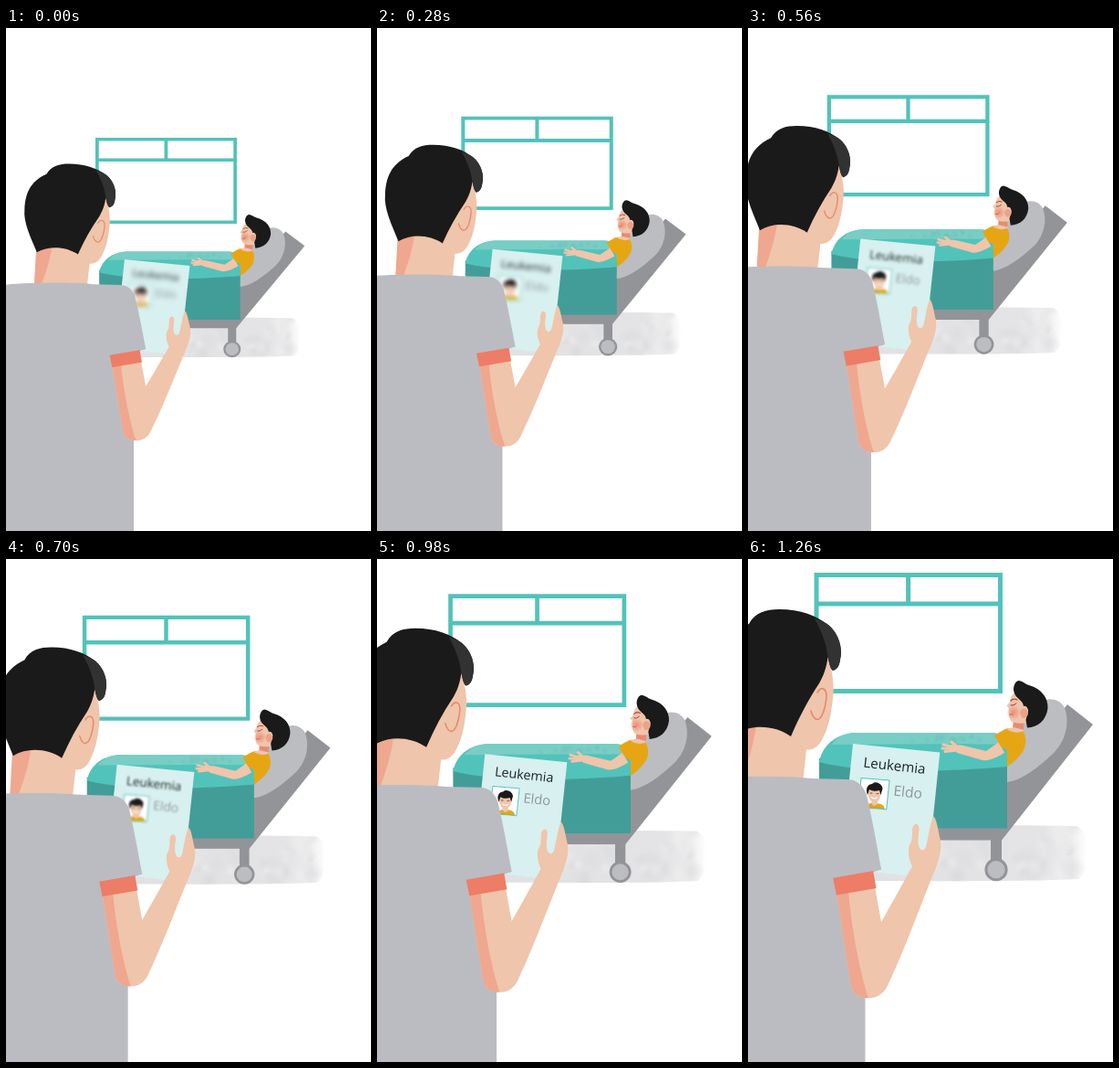
Recreate the animation shown at these times as an HTML page with a canvas. Size 400x550 px, loop 3.22 s.

```html
<!DOCTYPE html>
<html lang="en">
<head>
<meta charset="utf-8">
<title>Bedside</title>
<style>
html, body { margin: 0; height: 100%; overflow: hidden; background: #fff; }
canvas { display: block; width: 400px; height: 550px; }
</style>
</head>
<body>
<canvas id="stage" width="400" height="550"></canvas>
<script>
const ctx = document.getElementById('stage').getContext('2d');

const LOOP = 3220, STEP = 70, STEPS = 18;
const PIVOT = { x: 174.8, y: 379.5 };
const START = { x: 0.7506, y: 0.712 };
const FONT = '"Open Sans", "Noto Sans", sans-serif';

const TEAL = '#52c3ba', STEEL = '#929498', CLOTH = '#bbbcc1', SKIN = '#efc5ab',
  BLUSH = '#efa78f', CORAL = '#ed7d66', HAIR = '#1a1a1a', GOLD = '#e6a614';

const fill = (color, d) => {
  ctx.fillStyle = color;
  ctx.fill(new Path2D(d));
};

const line = (color, width, d) => {
  ctx.strokeStyle = color;
  ctx.lineWidth = width;
  ctx.stroke(new Path2D(d));
};

const disc = (color, x, y, r) => {
  ctx.fillStyle = color;
  ctx.beginPath();
  ctx.arc(x, y, r, 0, Math.PI * 2);
  ctx.fill();
};

const glow = (rgb, alpha, x, y, r) => {
  const g = ctx.createRadialGradient(x, y, 0, x, y, r);
  g.addColorStop(0, `rgba(${rgb},${alpha})`);
  g.addColorStop(1, `rgba(${rgb},0)`);
  disc(g, x, y, r);
};

const label = (text, color, size, x, y) => {
  ctx.save();
  ctx.translate(x, y);
  ctx.rotate(0.108);
  ctx.font = `${size}px ${FONT}`;
  ctx.fillStyle = color;
  ctx.fillText(text, 0, 0);
  ctx.restore();
};

const random = seed => () => (seed = (seed * 16807) % 2147483647) / 2147483647;

function drawWindow() {
  ctx.lineCap = 'butt';
  ctx.lineJoin = 'miter';
  line(TEAL, 5, 'M75 17.5H276.5V144.5H75ZM75 49H276.5M175.6 17V49');
  ctx.lineCap = ctx.lineJoin = 'round';
}

function drawFloor() {
  const wash = ctx.createLinearGradient(130, 0, 372, 0);
  wash.addColorStop(0, '#e1e1e3');
  wash.addColorStop(0.8, '#e4e4e6');
  wash.addColorStop(0.93, '#ececed');
  wash.addColorStop(1, 'rgba(240,240,241,0)');
  const shape = 'M130 293 C200 290 290 291 360 292 Q373 298 371 318 Q372 345 362 350 C300 353 200 352 130 352Z';
  ctx.save();
  fill(wash, shape);
  ctx.clip(new Path2D(shape));
  const rnd = random(41);
  for (let i = 0; i < 45; i++) {
    const shade = i % 2 ? '255,255,255' : '205,205,209';
    glow(shade, 0.22, 200 + rnd() * 170, 292 + rnd() * 60, 5 + rnd() * 11);
  }
  ctx.restore();
}

function drawBed() {
  fill(STEEL, 'M350 159L378 181L278 307.5H190V285H250Z');
  fill(STEEL, 'M266 300H278V333H266Z');
  disc(STEEL, 272, 339.7, 12.6);
  disc('#bcbdc1', 272, 339.7, 9.6);
  fill('#bcbdc1', 'M284 244C300 242 318 228 335 212C350 197 352 176 347 163C342 152 328 150 319 158L280 200Z');
  fill('#429d98', 'M78 218H284V294.5H78Z');
  fill(TEAL, 'M78 222C81 205 95 191 118 190H268Q280 192 284 204V227C230 232 130 236 78 222Z');
  fill('#78cdc5', 'M91 203C98 195 106 190 118 190H270Q280 191 274 202Q260 203 240 202Z');
  const rnd = random(7);
  for (let i = 0; i < 14; i++) {
    glow('110,190,184', 0.45, 180 + rnd() * 80, 193 + rnd() * 7, 2 + rnd() * 4);
  }
}

function drawPatient() {
  fill(SKIN, 'M275 200L261 210L236 204Q228 202 225 206L229 212L257 220Q264 222 281 212Z');
  line(SKIN, 3, 'M231 207L223 200M230 207L214 203M230 208L213 207M230 209L216 210.5');
  line(SKIN, 6, 'M232 208L224 206');
  fill(GOLD, 'M270 193C276 189 281 186 285 185L302 189Q306 197 303 207C299 215 292 222 284 227V209L277 205Z');
  fill('#e88b70', 'M291 174H302V187L296 190L290 186Z');
  fill(SKIN, 'M283 186L291 184L303 187Q296 193 283 186Z');
  fill(SKIN, 'M293 145C288 150 287.5 153 287 156L283.5 160.5L286 163C285 169 286 175 289 178Q296 181 306 179V152Z');
  glow('237,110,90', 0.65, 291, 168, 8);
  fill(HAIR, 'M297 133C302 134 304 137 308 138C322 142 329 152 328.500 163C327 176 318 184 306 184.500L304.500 176L307 166Q306 160 302 161C301 153 292 153 291 143C291 137 294 133 297 133Z');
  fill('#eda287', 'M298 168C299 162 306 162 307 168C307 174 301 175 300 173Z');
  line('#8d4034', 1, 'M288 160Q291 161 294 158');
  line('#b9432f', 1.2, 'M288 155Q291 152 295 154');
  line('#c95c4a', 1, 'M287 170L290 170');
}

function drawPhoto() {
  ctx.lineJoin = 'miter';
  const frame = 'M124.500 239.500L155 242L151.700 274L121 270Z';
  fill('#fff', frame);
  fill(GOLD, 'M129 273C130 267 135 266 139 267C146 267 149 269 150 273.600Z');
  fill(SKIN, 'M136 262H142V268L138 270L135 267Z');
  fill(SKIN, 'M131.500 250H145.500V257C145 263 142 266 138 266C134 265 131 262 131.500 250Z');
  fill(HAIR, 'M131 258C128 250 132 246 136 246C140 242 147 246 147.500 251L145.500 258L144 253Q137 255 133 252Z');
  line('#5a3a31', 0.8, 'M134 256H136M141 256.500H143');
  line('#fff', 1.3, 'M135.500 260.500Q138.500 263 141.500 260.800');
  line(TEAL, 1, frame);
  ctx.lineJoin = 'round';
}

function drawCard(blur) {
  fill('#d8f0ef', 'M115 202L210.300 211.500L196 349L101 338Z');
  ctx.filter = blur > 0.05 ? `blur(${blur}px)` : 'none';
  drawPhoto();
  label('Leukemia', '#1c2526', 15.2, 126, 227.6);
  label('Eldo', '#8d9799', 15.6, 159, 258.6);
  ctx.filter = 'none';
}

function drawMan() {
  // head and neck
  fill(SKIN, 'M-13 185L40 120L87 104C92 120 95 138 93 152C91 172 88 184 82 196C77 206 71 209 64 208.500L60 245H-17Z');
  fill(BLUSH, 'M-14 186L9 181C7 200 0 222 -7 242H-17Z');
  fill(HAIR, 'M-13 191C-22 168 -33 145 -31 125C-30 95 -18 80 1 71C8 58 20 55 34 55C58 55 75 62 88 72C100 82 104 98 101 110C100 118 97 121 93 122C90 120 89 113 87.500 107C86 120 82 129 78 136C66 154 56 173 47 194C30 182 5 180 -13 191Z');
  fill('#323232', 'M73 65C79 67 84 69 88 72C100 82 104 98 101 110C100 118 97 121 93 122C90 120 89 113 87.500 107C86 92 80 78 73 65Z');
  line('#e88468', 1.5, 'M76 146C80 139 86 141 86 150C85 163 81 175 76 175.500C72 175 70 170 69 166');

  // shirt and arm
  fill(CLOTH, 'M-70 242C-40 238 30 236 70 240L108 241C119 241 126 247 130 258C136 283 141 312 146 339.500L128.500 345V630H-70Z');
  fill(SKIN, 'M139 358L146 397C160 373 172 350 180 336C176 328 175 318 177 313C180 308 180 303 180 297C180 288 188 287 187.500 296C186 305 186 312 188 316Q191 321 194.500 316C197 310 198 295 203 281C207 284 208 296 211 308C213 322 207 335 200 352C185 390 170 430 155 462C150 475 142 481 130 480C120 480 113 474 112 462L97 365Z');
  fill(BLUSH, 'M97 365L110 363C113 400 122 450 132 480C119 481 113 472 112 462Z');
  fill(CORAL, 'M93 348L137 340L140.500 360L97 367.500Z');
  fill(CLOTH, 'M90 330L140 315L146 339.500L93 348.800Z');
}

function draw(time) {
  const step = Math.min(STEPS, Math.floor((time % LOOP) / STEP));
  const p = step / STEPS;
  const sx = START.x + (1 - START.x) * p;
  const sy = START.y + (1 - START.y) * p;

  ctx.setTransform(1, 0, 0, 1, 0, 0);
  ctx.fillStyle = '#fff';
  ctx.fillRect(0, 0, 400, 550);
  ctx.setTransform(sx, 0, 0, sy, PIVOT.x * (1 - sx), PIVOT.y * (1 - sy));

  drawWindow();
  drawFloor();
  drawBed();
  drawPatient();
  drawCard(Math.max(0, 2.8 * (1 - step / 16)));
  drawMan();
}

const start = performance.now();
function tick() {
  draw(performance.now() - start);
  requestAnimationFrame(tick);
}
tick();
</script>
</body>
</html>
```
